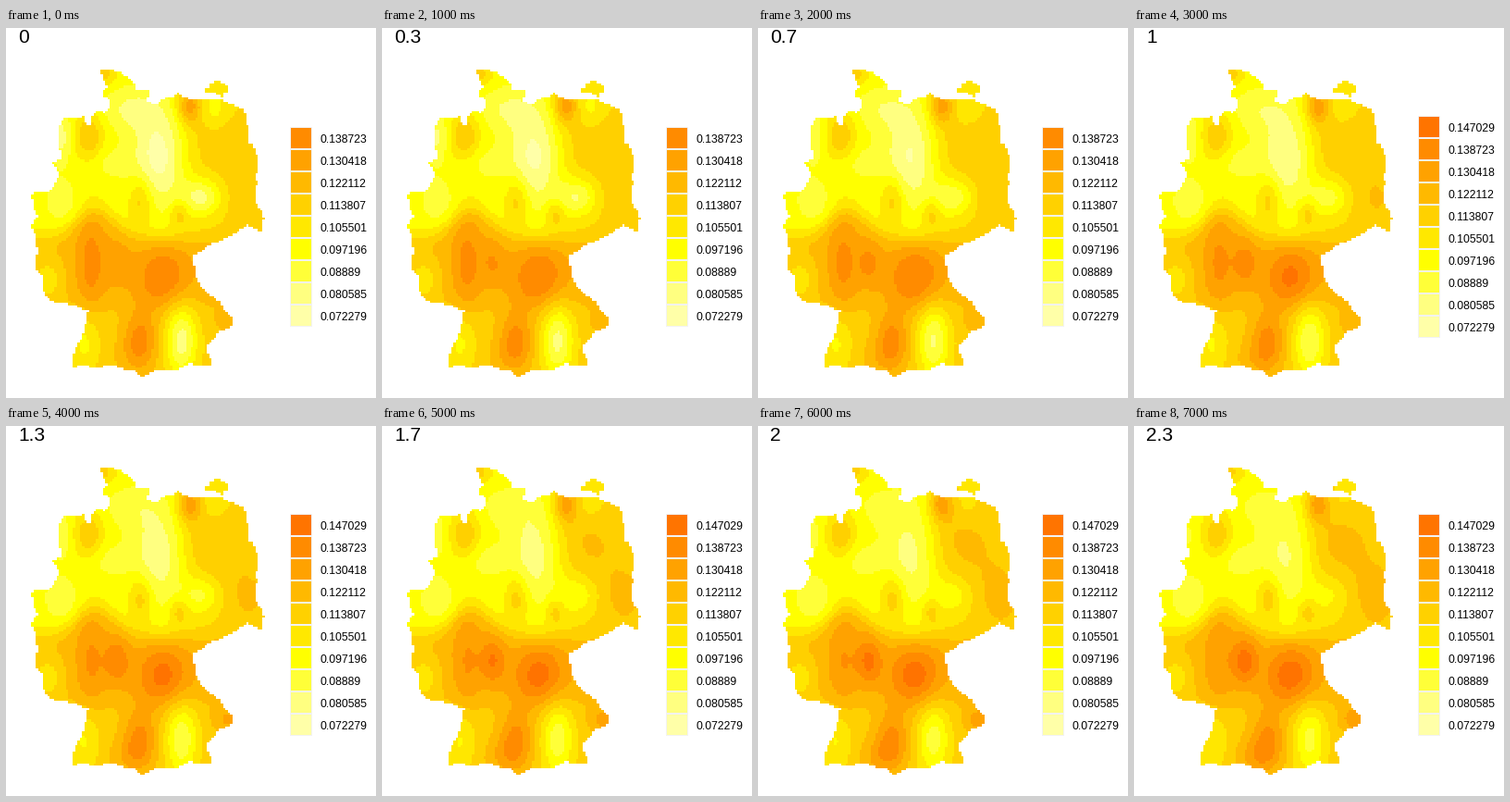
Write a matplotlib script that moves like this. It is 400 px wide and 400 px high and loops after 8000 ms.

```python
import numpy as np
import matplotlib.pyplot as plt
from matplotlib.animation import FuncAnimation
from matplotlib.patches import Rectangle
from matplotlib.path import Path

SIZE = 400
CELL = 2.5
STEPS = 8
PITCH = 24
FONT = "Liberation Sans"

PALE = [(255, 255, blue) for blue in (168, 128, 56)]
WARM = [(255, 255 - 23.18 * k, 0) for k in range(7)]
COLORS = np.array(PALE + WARM) / 255

# Key points of the outline, clockwise from the north-western tip
OUTLINE = [
    (101, 44), (116, 46), (131, 53), (139, 60), (140, 67), (156, 66),
    (153, 79), (161, 83), (172, 76), (186, 71), (197, 76), (213, 77),
    (238, 79), (257, 88), (263, 109), (261, 121), (268, 128), (270, 175),
    (279, 207), (276, 221), (260, 212), (240, 226), (203, 245), (204, 260),
    (210, 278), (244, 314), (244, 323), (232, 328), (217, 343), (224, 367),
    (200, 363), (160, 371), (148, 378), (140, 371), (112, 364), (73, 367),
    (76, 345), (90, 305), (65, 297), (48, 295), (40, 283), (41, 269),
    (33, 262), (34, 238), (28, 214), (35, 205), (28, 179), (46, 178),
    (58, 160), (51, 146), (61, 140), (58, 105), (64, 97), (84, 96),
    (89, 107), (99, 89), (108, 93), (113, 80), (104, 72), (110, 64),
]
ISLAND = [(214, 67), (228, 57), (241, 65), (235, 74), (222, 71)]

# Hills and dips: x, y, width, height, strength at the start and at the end
NORTH = [
    (166, 138, 20, 36, -3.1, -1.9), (135, 88, 22, 16, -1.6, -0.6),
    (60, 118, 8, 20, -1.9, -0.6), (90, 118, 11, 18, 2.6, 2.4),
    (108, 145, 18, 14, -0.8, -0.9), (60, 187, 12, 16, -1.2, -1.5),
    (106, 50, 9, 9, 2.0, 1.7), (146, 186, 9, 18, 2.2, 2.3),
    (212, 183, 15, 14, -3.2, -1.2), (187, 201, 7, 10, 1.8, 1.6),
    (198, 85, 9, 13, 3.2, 3.0), (225, 86, 10, 14, -1.5, -0.4),
    (220, 125, 30, 28, 0.6, 1.5), (262, 185, 22, 28, 0.8, 1.6),
]
SOUTH = [
    (92, 255, 11, 38, 2.0, 1.4), (120, 254, 10, 18, 1.2, 3.0),
    (170, 270, 20, 24, 2.6, 3.2), (45, 272, 13, 18, -2.0, -2.0),
    (145, 338, 13, 22, 3.0, 2.7), (132, 358, 16, 14, 0.4, 1.6),
    (85, 340, 12, 24, -1.8, -1.6), (190, 338, 12, 28, -4.0, -2.9),
    (240, 318, 12, 10, 0.8, 2.2),
]


def roughen(points, rng, rounds=3, amount=0.09):
    """Break each edge at a midpoint shifted in proportion to its length."""
    line = np.array(points, float)
    for _ in range(rounds):
        nxt = np.roll(line, -1, axis=0)
        length = np.hypot(*(nxt - line).T)[:, None]
        mid = (line + nxt) / 2 + rng.uniform(-amount, amount, line.shape) * length
        line = np.stack([line, mid], 1).reshape(-1, 2)
    return Path(np.vstack([line, line[:1]]))


def bell(d):
    return np.exp(-d ** 2 / 2)


def rise(d):
    return 1 / (1 + np.exp(-d))


rng = np.random.default_rng(4)
axis = np.arange(CELL / 2, SIZE, CELL)
gx, gy = np.meshgrid(axis, axis)
cells = np.column_stack([gx.ravel(), gy.ravel()])
land = (roughen(OUTLINE, rng).contains_points(cells)
        | roughen(ISLAND, rng, amount=0.2).contains_points(cells))
land = land.reshape(gx.shape)

# Low north (higher in the east), high centre, medium south
north = 3 + 1.4 * rise((gx - 192) / 8)
south = 6 - rise((gy - 300) / 8)
border = 228 - 30 * bell((gx - 98) / 22)
base = north + (south - north) * rise((gy - border) / 6)


def surface(t):
    field = base.copy()
    for x, y, w, h, start, end in NORTH + SOUTH:
        hill = bell(np.hypot((gx - x) / w, (gy - y) / h))
        field += (start + (end - start) * t) * hill
    return field


fig = plt.figure(figsize=(4, 4), dpi=100, facecolor="white")
ax = fig.add_axes([0, 0, 1, 1])
ax.axis("off")
image = ax.imshow(np.ones(gx.shape + (3,)), extent=(0, SIZE, SIZE, 0),
                  interpolation="nearest", aspect="auto")
ax.set_xlim(0, SIZE)
ax.set_ylim(SIZE, 0)


def label(x, y, text, px):
    return ax.text(x, y, text, fontsize=px * 0.72, family=FONT,
                   color="black", va="baseline")


def box(x, size, color):
    return ax.add_patch(Rectangle((x, 0), size, size, fc=color, lw=0))


title = label(13.2, 15.5, "", 21)
keys = []
for level, color in enumerate(COLORS):
    value = f"{0.072279 + level * 0.00830555:.6f}".rstrip("0")
    keys.append((box(307, PITCH, "#f2f2f2"), box(308, PITCH - 2, color),
                 label(339, 0, value, 12.2)))


def draw(i):
    top = 8 if i < 3 else 9
    title.set_text(f"{round(i / 3, 1):g}")

    steps = np.clip(np.rint(surface(i / (STEPS - 1))), 0, top).astype(int)
    image.set_data(np.where(land[..., None], COLORS[steps], 1.0))

    for level, (frame, swatch, text) in enumerate(keys):
        y = 215 + (top / 2 - level) * PITCH
        frame.set_y(y - PITCH / 2)
        swatch.set_y(y - PITCH / 2 + 1)
        text.set_y(y + 4.5)
        for part in (frame, swatch, text):
            part.set_visible(level <= top)
    return [image, title]


anim = FuncAnimation(fig, draw, frames=STEPS, interval=1000,
                     repeat=True, repeat_delay=0)
plt.show()
```
